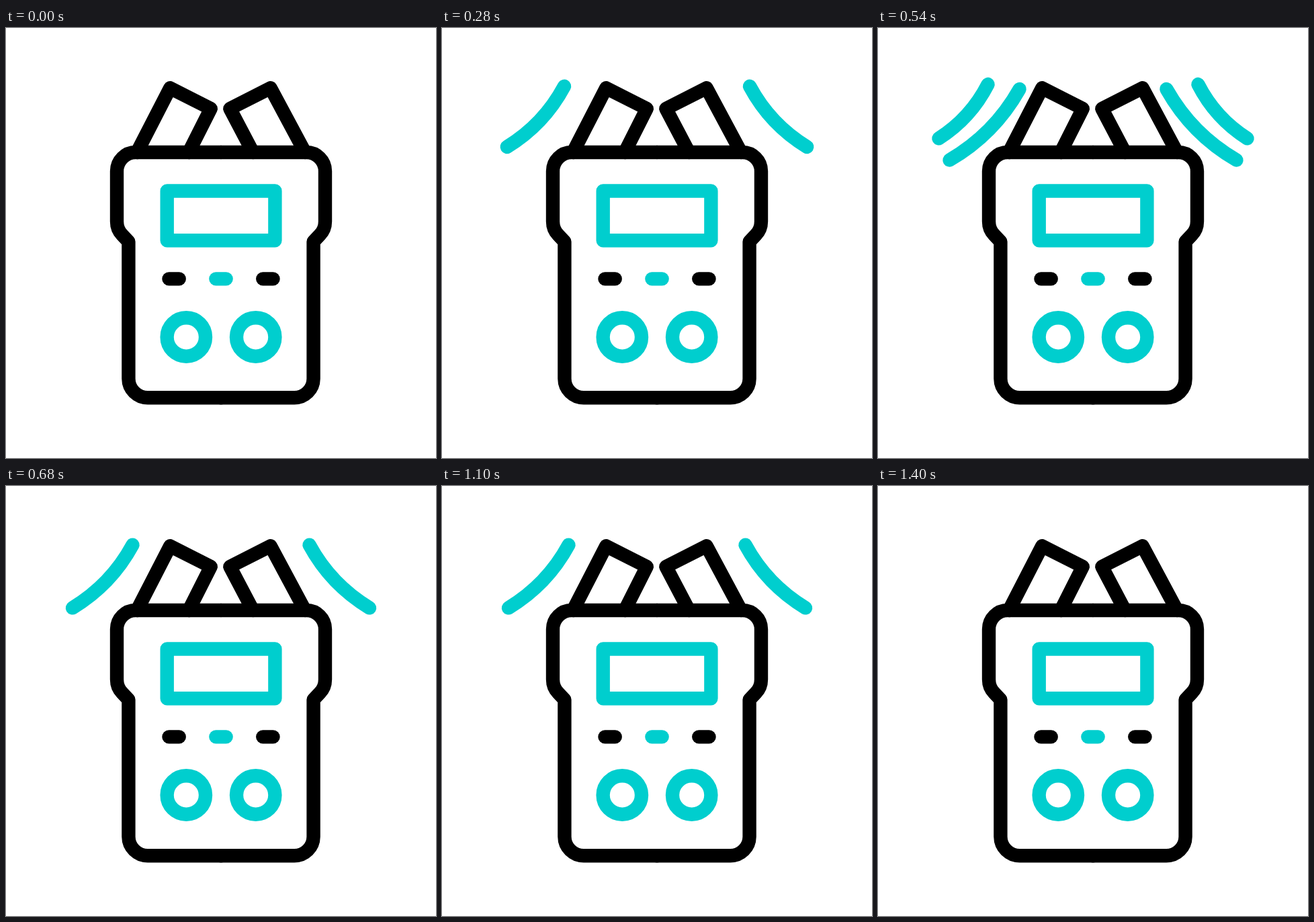
These frames come from a looping animation (640 by 640 pixels, 1800 ms). An HTML page with a canvas:

```html
<!DOCTYPE html>
<html lang="en">
<head>
<meta charset="utf-8">
<title>Voice recorder</title>
<style>
  html, body { margin: 0; width: 100%; height: 100%; overflow: hidden; background: #fff; }
  canvas { display: block; width: 640px; height: 640px; }
</style>
</head>
<body>
<canvas id="stage" width="640" height="640"></canvas>
<script>
const ctx = document.getElementById('stage').getContext('2d');
const SIZE = 640, LOOP = 1800, STEP = 20;
const BLACK = '#000', TEAL = '#00cece';

// Sound waves: start times, visible life and easing span in ms
const WAVE_STARTS = [40, 400, 820];
const WAVE_LIFE = 580, WAVE_SPAN = 570;
const WAVE_FROM = { top: [134.3, 79.4], bottom: [80.4, 144.3] };
const WAVE_TO = { top: [212, 91.2], bottom: [107, 197.5] };
const WAVE_BULGE = 0.136;

const bodyHalf = 'M320 185 H193 A28 28 0 0 0 165 213 V288 C165 296 168 303 173 308 ' +
  'L182.4 318 V522 A28.5 28.5 0 0 0 211 550.3 H320';
const body = new Path2D(bodyHalf);
const leftArm = new Path2D('M195 185 L244.2 89.3 L304.8 120 L272 185');
const rightArm = new Path2D('M445 185 L393.7 89.3 L333.3 120 L367.5 185');
const screen = new Path2D('M239.7 242.5 H400.4 V316.2 H239.7 Z');

const mix = (a, b, k) => a.map((v, i) => v + (b[i] - v) * k);

function stroke(path, color) {
  ctx.strokeStyle = color;
  ctx.stroke(path);
}

function mirrored(draw) {
  draw();
  ctx.save();
  ctx.translate(SIZE, 0);
  ctx.scale(-1, 1);
  draw();
  ctx.restore();
}

function drawPill(x, color) {
  stroke(new Path2D(`M${x - 7.6} 373.4 h15.2`), color);
}

function drawReel() {
  const ring = new Path2D();
  ring.arc(268.3, 460, 28.7, 0, Math.PI * 2);
  stroke(ring, TEAL);
}

function drawWave(age) {
  const k = Math.sin(Math.min(age / WAVE_SPAN, 1) * Math.PI / 2);
  const [x1, y1] = mix(WAVE_FROM.top, WAVE_TO.top, k);
  const [x2, y2] = mix(WAVE_FROM.bottom, WAVE_TO.bottom, k);
  const cx = (x1 + x2) / 2 + (y2 - y1) * WAVE_BULGE;
  const cy = (y1 + y2) / 2 + (x1 - x2) * WAVE_BULGE;
  const arc = new Path2D(`M${x1} ${y1} Q${cx} ${cy} ${x2} ${y2}`);
  mirrored(() => stroke(arc, TEAL));
}

function drawRecorder() {
  stroke(leftArm, BLACK);
  stroke(rightArm, BLACK);
  mirrored(() => stroke(body, BLACK));
  stroke(screen, TEAL);
  drawPill(250.1, BLACK);
  drawPill(320, TEAL);
  drawPill(389.9, BLACK);
  mirrored(drawReel);
}

function render(now) {
  const t = Math.floor((now % LOOP + 0.5) / STEP) * STEP;
  ctx.fillStyle = '#fff';
  ctx.fillRect(0, 0, SIZE, SIZE);
  ctx.lineWidth = 20.4;
  ctx.lineCap = ctx.lineJoin = 'round';
  for (const start of WAVE_STARTS) {
    const age = t - start;
    if (age >= 0 && age < WAVE_LIFE) drawWave(age);
  }
  drawRecorder();
}

function tick() {
  render(performance.now());
  requestAnimationFrame(tick);
}
tick();
</script>
</body>
</html>
```
